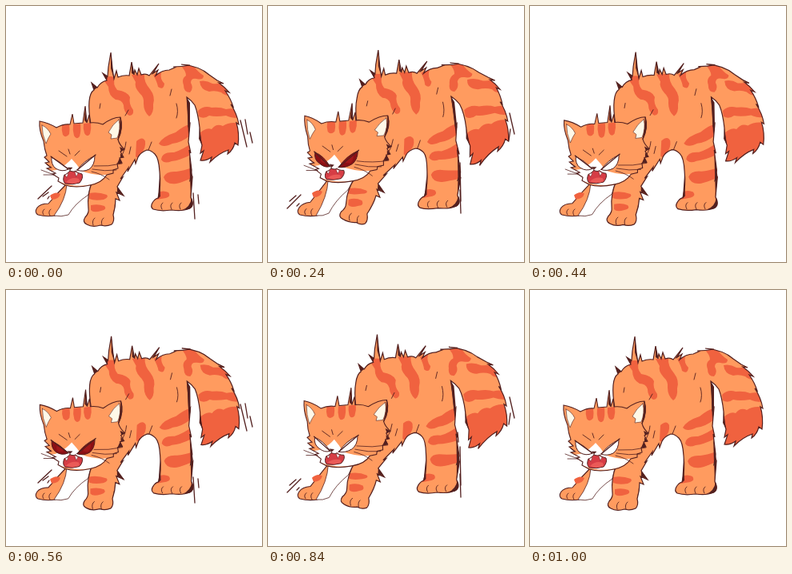
An HTML page that plays this animation: 320x320 px, repeating every 2 s.

```html
<!DOCTYPE html>
<html lang="en">
<head>
<meta charset="utf-8">
<title>Angry cat</title>
<style>
html, body { margin: 0; width: 100%; height: 100%; overflow: hidden; background: #fff; }
svg { display: block; width: 100vw; height: 100vh; }
path { stroke-linecap: round; stroke-miterlimit: 5; }
</style>
</head>
<body>
<svg id="stage" viewBox="0 0 320 320"></svg>
<script>
const LOOP = 2000, SHAKE = 1000, CYCLE = 500, STEP = 40;
const INK = '#53201f', FUR = '#ff9b5f', STRIPE = '#f0623f', WHITE = '#fff', CREAM = '#fff8e8';

// Lean of the body: x, y at rest, then the shift at full stretch.
const anchors = [
  [42, 144, 4, -7], [144, 139, 7, -2], [66, 197, 3, -7], [101, 196, 1, -7],
  [83, 208, -1, -3], [83, 222, -1, -6], [147, 190, 6, -4], [118, 218, 2, -5],
  [52, 200, 1, -6], [88, 150, 5, -3], [108, 104, 8, -4], [131, 58, 7, -3],
  [158, 72, 7, -3], [190, 72, 8, -3], [150, 120, 6, -2], [205, 120, 6, -2],
  [165, 185, 8, -3], [178, 180, 9, -2], [230, 74, 9, -2], [272, 97, 12, -4],
  [291, 146, 9, -4], [290, 174, 11, -5], [245, 193, 10, 5], [243, 152, 6, 1],
  [228, 115, 3, -1], [228, 165, 7, -2], [192, 210, 7, -3], [182, 253, 6, -2],
  [232, 250, 6, -3], [98, 268, -8, -7], [134, 268, -11, -1], [115, 245, -6, -8],
  [140, 235, -2, -4], [37, 257, 0, 0], [62, 262, 0, 0], [62, 235, 0, -3], [78, 262, -2, -2]
];

const body =
  'M106 148Q103 130 104 119Q105 108 110 105L107 96L114 102Q118 95 126 93L121 84L127 88L128 76' +
  'L131 58L133 78L135 91L138 81L140 89Q147 86 154 87L157 70L160 86L161 80L164 86L166 78L169 86' +
  'Q175 84 179 87L191 72L184 84L190 80L187 87Q195 80 204 80L213 76L209 76Q220 76 230 74L219 73' +
  'Q242 75 254 86L264 93L272 97L266 96Q273 101 279 108L274 106Q281 116 284 126L281 123' +
  'Q289 135 291 148L288 146Q292 159 290 174L286 171Q284 180 277 185L278 180Q266 184 255 195' +
  'L257 189Q250 194 243 193L247 181L243 184L245 174Q242 166 242 152Q240 134 236 124' +
  'Q232 118 226 114Q228 132 228 150L230 147L228 170L231 184L229 180L232 205L230 218L233 214' +
  'L231 239Q235 251 229 253Q221 257 207 255Q193 257 184 254Q180 251 183 246Q186 241 190 240' +
  'Q194 226 192 207Q191 190 186 185Q181 180 176 180Q168 183 165 189L162 197L161 192Q155 202 152 207' +
  'L153 202L143 216L146 214L139 226L147 237L138 233L142 243L137 241Q137 251 134 261' +
  'Q136 269 132 273Q125 276 118 274Q108 277 101 273Q95 270 99 264Q104 259 103 253Q101 236 108 219L110 170Z';
const farLeg = 'M76 222Q65 233 53 247Q43 247 39 252Q35 258 40 261Q50 264 62 262Q70 253 79 229Z';
const chest = 'M76 223Q75 242 60 262Q69 264 78 261Q86 247 103 236L106 223Z';
const head =
  'M51 187Q48 179 47 169Q41 155 42 144Q53 146 63 152Q72 147 80 148L83 135L85 147' +
  'L96 146L99 125L101 146L104 136L105 146Q113 145 121 148Q133 139 143 139Q147 152 140 167' +
  'Q142 174 148 179L143 182L147 189L142 190L145 196L139 197L140 203L134 205L134 209L126 211' +
  'Q120 221 105 224Q87 228 74 224L65 219L66 215L58 210L62 209L51 203L56 202L49 196L54 195L48 189Z';
const muzzle = 'M82 191Q76 198 67 203Q62 206 56 206L62 209L58 210L66 215L65 219Q86 228 107 223Q119 220 126 211Q108 212 94 206Q89 198 82 191Z';
const eyes = 'M57 189Q67 194 78 204Q70 208 62 203Q56 198 57 189ZM89 205Q97 194 111 187Q111 199 104 204Q96 208 89 205Z';
const irises = 'M63 196Q68 197 72 202Q66 204 63 200ZM96 202Q99 196 106 193Q106 200 102 203Z';

const bodyStripes =
  'M121 91Q128 86 136 89Q133 98 139 105Q152 107 155 114Q153 122 159 130Q160 137 154 137Q147 133 147 124' +
  'Q145 117 137 117Q128 112 128 101Z' +
  'M157 86L173 85Q172 95 180 104Q187 113 184 123Q185 134 179 138Q172 132 172 122Q173 114 167 109Q160 101 162 95Z' +
  'M184 86L194 83Q192 91 198 97Q197 106 190 101Q189 95 184 86Z' +
  'M163 169Q171 162 174 169Q175 178 169 184Q164 192 162 188Z' +
  'M191 172Q196 163 212 158Q223 149 230 148L230 162Q219 171 208 172Q196 178 191 172Z' +
  'M194 192Q195 182 210 183Q222 179 231 172L231 186Q217 193 207 194Q198 198 194 192Z' +
  'M197 214Q200 206 213 207Q222 206 233 202L232 215Q219 221 213 222Q200 224 197 214Z' +
  'M189 233Q197 230 203 233Q207 238 200 240L188 242Z' +
  'M104 234Q115 232 126 236Q129 239 122 242Q111 244 104 241Z' +
  'M106 249Q115 247 123 250Q127 254 119 256Q109 259 106 255Z';
const tailStripes =
  'M218 74Q227 72 234 74Q239 82 247 87Q247 93 238 91Q231 90 231 96Q235 103 230 108Q222 108 222 99Q219 91 225 87Q225 81 218 74Z' +
  'M242 94Q250 92 258 97Q267 98 274 94L283 112Q274 113 269 108Q261 105 254 107Q243 105 242 94Z' +
  'M240 131Q247 124 257 127Q268 126 275 129Q283 127 289 130L290 140Q281 140 275 137Q262 139 254 137Q247 142 241 138Z' +
  'M241 160Q250 151 257 154Q263 146 271 150Q280 144 293 147L294 200L238 198Z';
const headStripes =
  'M70 149L79 148Q80 154 79 160Q75 166 71 161Q69 155 70 149ZM84 148L93 147Q94 156 92 163Q88 168 85 162Q83 155 84 148Z' +
  'M97 147L106 146Q107 153 105 160Q101 165 98 159Q96 153 97 147Z';
const furMarks =
  'M118 122L117 128M207 104L205 112M213 122Q216 132 213 140M178 180L182 170' +
  'M150 170Q149 180 144 188M156 176L154 185M153 130L149 137' +
  'M109 274Q107 268 111 265M120 274Q118 268 122 265M195 254Q192 249 196 246M207 254Q204 249 208 246M218 254Q215 249 219 246';
const shade = 'M226 114L230 121L230 152L228 162ZM229 183L233 212L231 240L230 215ZM242 152L245 174L241 166Z' +
  'M232 240Q237 250 229 254L220 255Q230 252 232 240ZM139 226L146 236L139 233ZM137 241L135 257L134 261ZM192 210L193 238L190 241Z' +
  'M131 58L133 78L135 91L131 78ZM157 70L160 86L157 84ZM191 72L184 84L181 86ZM99 125L101 146L98 143Z' +
  'M107 96L114 102L110 105ZM121 84L127 88L126 93ZM148 179L144 182L142 176ZM147 189L143 190L143 184ZM145 196L139 197L142 190Z';

const NONE = 'none';
// path, fill, stroke, width, tag
const layers = [
  [farLeg, FUR, INK, 1.1],
  ['M55 237Q62 231 68 235Q66 242 57 242Z', STRIPE],
  [chest, WHITE, INK, .8],
  ['M47 261Q44 257 48 254M55 262Q52 257 56 254', NONE, INK, .9],
  [body, FUR],
  [bodyStripes, STRIPE, , , 'clip'],
  [tailStripes, STRIPE, , , 'clip'],
  [body, NONE, INK, 1.2],
  [furMarks, NONE, INK, .9],
  [head, FUR],
  [headStripes, STRIPE],
  [muzzle, WHITE],
  [head, NONE, INK, 1.1],
  [shade, INK],
  ['M45 149Q52 152 56 160L53 165L50 172Q45 161 45 149Z', CREAM, INK, .6],
  ['M141 142Q133 148 128 158L132 161L131 166L139 165Q144 154 141 142Z', CREAM, INK, .6],
  ['M143 140Q147 153 140 167Q143 154 143 140Z', INK, INK, .8],
  [eyes, WHITE, INK, 1, 'eyes'],
  [irises, '#a0181a', NONE, 0, 'irises'],
  ['M56 188L78 204M89 205L112 186', NONE, INK, 1.2],
  ['M66 181L76 188M86 187L92 181M78 179L80 185', NONE, INK, .9],
  ['M77 202L83 202L80 205Z', INK, INK, .5],
  ['M80 206Q75 211 73 211Q70 218 74 222Q83 224 92 221Q97 215 95 210Q89 209 87 206Q85 208 80 206Z', '#d63d45', INK, 1],
  ['M75 220Q82 213 91 216L92 220Q83 224 75 220Z', '#ea5a57'],
  ['M74 211L78 209L76 214ZM86 207L90 209L88 213Z', WHITE, INK, .4],
  ['M44 205L60 211M47 211L61 211M51 198L57 202M107 207Q120 210 129 217M108 204Q124 207 138 205M110 200Q128 201 145 197', NONE, INK, .8]
];
const restLines = 'M40 241L57 225M46 238L53 233M52 241L54 238M293 143L301 176M299 142L302 160M305 158L308 171M234 234L236 266M240 236L241 247';
const stretchLines = 'M24 253L41 236M27 244L35 237M36 250L39 247M240 196L241 244M240 230L241 259M237 178L238 190M302 134L308 160M303 154L301 168';

const stage = document.getElementById('stage');
function add(parent, name, attrs) {
  const el = document.createElementNS('http://www.w3.org/2000/svg', name);
  for (const key in attrs) el.setAttribute(key, attrs[key]);
  return parent.appendChild(el);
}

// Inverse-distance blend of the anchor shifts.
function shift(x, y) {
  let sum = 0, dx = 0, dy = 0;
  for (const [ax, ay, sx, sy] of anchors) {
    const w = ((x - ax) ** 2 + (y - ay) ** 2 + 4) ** -1.5;
    sum += w; dx += w * sx; dy += w * sy;
  }
  return [dx / sum, dy / sum];
}

function lean(d, amount) {
  return d.replace(/(\d+) (\d+)/g, (_, x, y) => {
    const [dx, dy] = shift(+x, +y);
    return (+x + dx * amount).toFixed(2) + ' ' + (+y + dy * amount).toFixed(2);
  });
}

const clip = add(stage, 'clipPath', { id: 'coat' });
const parts = [{ d: body, el: add(clip, 'path', {}) }];
const tagged = {};
for (const [d, fill, stroke = NONE, width = 0, tag] of layers) {
  const el = add(stage, 'path', { fill, stroke, 'stroke-width': width });
  if (tag === 'clip') el.setAttribute('clip-path', 'url(#coat)');
  else if (tag) tagged[tag] = el;
  parts.push({ d, el });
}
const [restSpeed, stretchSpeed] = [restLines, stretchLines].map(d =>
  add(stage, 'path', { d, fill: NONE, stroke: INK, 'stroke-width': 1.3 }));

const show = (el, on) => el.setAttribute('visibility', on ? 'visible' : 'hidden');
let shown = -1;

function draw(now) {
  const time = Math.min(SHAKE, Math.floor((now % LOOP) / STEP) * STEP);
  if (time !== shown) {
    shown = time;
    const phase = time % CYCLE;
    const amount = Math.sin(Math.PI * (phase / CYCLE) ** 1.1) ** 2;
    const red = phase >= 40 && phase < 300;
    const shaking = time < SHAKE && phase < 390;
    for (const { d, el } of parts) el.setAttribute('d', lean(d, amount));
    tagged.eyes.setAttribute('fill', red ? '#8a1014' : WHITE);
    show(tagged.irises, red);
    show(restSpeed, shaking && phase < 130);
    show(stretchSpeed, shaking && phase >= 130);
  }
}

const start = performance.now();
function tick() {
  draw(performance.now() - start);
  requestAnimationFrame(tick);
}
tick();
</script>
</body>
</html>
```
